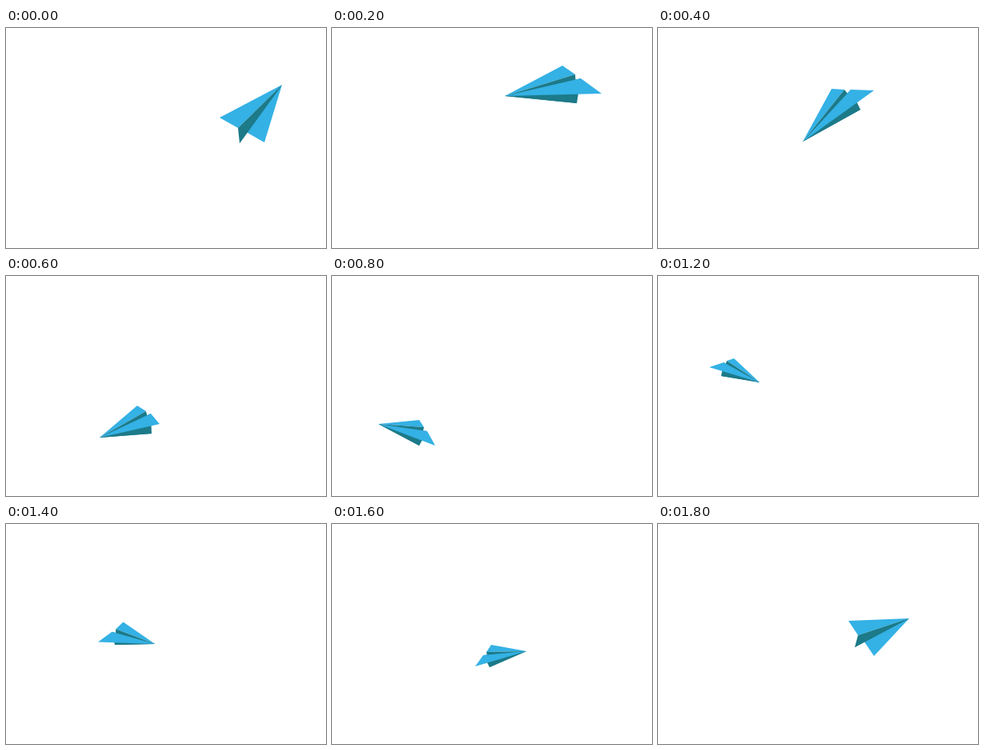
An HTML page with a canvas for the animation above (1.9 s loop, 400 by 275 pixels).

```html
<!DOCTYPE html>
<html lang="en">
<head>
<meta charset="utf-8">
<title>Paper plane</title>
<style>
  html, body { margin: 0; width: 100%; height: 100%; overflow: hidden; background: #fff; }
  canvas { display: block; }
</style>
</head>
<body>
<canvas id="stage" width="400" height="275"></canvas>
<script>
const ctx = document.getElementById('stage').getContext('2d');
const LOOP = 1900, STEP = 100;
const PAPER = '#34b1e5', SHADE = '#1c7a89';

// Poses: time, then x,y of nose, left tip, left fold, keel, right fold, right tip.
const poses = [
  [0,    345, 71,  323, 143, 293, 126, 292, 144, 290, 125, 267, 112],
  [100,  284, 71,  356, 104, 320, 96,  303, 116, 305, 89,  270, 73],
  [200,  216, 85,  337, 82,  311, 63,  306, 94,  304, 58,  288, 47],
  [400,  181, 142, 270, 78,  241, 77,  253, 102, 233, 77,  217, 76],
  [600,  117, 202, 192, 185, 181, 172, 182, 197, 175, 169, 164, 162],
  [800,  58, 185,  129, 212, 119, 194, 109, 212, 115, 189, 109, 180],
  [1000, 40, 126,  30, 143,  52, 146,  54, 162,  58, 147,  82, 152],
  [1200, 127, 133, 95, 103,  86, 106,  79, 125,  82, 108,  64, 114],
  [1600, 243, 159, 199, 151, 193, 160, 197, 179, 189, 164, 179, 178],
  [1800, 314, 118, 270, 165, 253, 140, 246, 154, 250, 139, 238, 121]
];

// Pose at any index, with its time unwrapped past the loop ends.
function poseAt(i) {
  const n = poses.length, turn = Math.floor(i / n);
  const [time, ...coords] = poses[i - turn * n];
  return { time: time + turn * LOOP, coords };
}

// Smooth cubic path through the poses.
function interpolate(t) {
  const i = poses.findLastIndex(p => p[0] <= t);
  const [a, b, c, d] = [i - 1, i, i + 1, i + 2].map(poseAt);
  const span = c.time - b.time, u = (t - b.time) / span;
  const ease = u * u * (3 - 2 * u);
  const flat = [];
  b.coords.forEach((from, k) => {
    const to = c.coords[k];
    const leave = (to - a.coords[k]) / (c.time - a.time) * span;
    const arrive = (d.coords[k] - from) / (d.time - b.time) * span;
    flat.push(from + (to - from) * ease
      + leave * u * (1 - u) * (1 - u) - arrive * u * u * (1 - u));
  });
  return [0, 2, 4, 6, 8, 10].map(k => ({ x: flat[k], y: flat[k + 1] }));
}

function triangle(color, ...points) {
  ctx.fillStyle = color;
  ctx.beginPath();
  points.forEach(p => ctx.lineTo(p.x, p.y));
  ctx.fill();
}

function drawPlane([nose, leftTip, leftFold, keel, rightFold, rightTip]) {
  const left = { tip: leftTip, fold: leftFold };
  const right = { tip: rightTip, fold: rightFold };
  const wing = side => triangle(PAPER, nose, side.fold, side.tip);
  const body = side => triangle(SHADE, nose, side.fold, keel);
  const [far, near] = leftTip.y > rightTip.y ? [right, left] : [left, right];
  const fromBelow = (leftTip.x - nose.x) * (rightTip.y - nose.y)
    > (leftTip.y - nose.y) * (rightTip.x - nose.x);

  wing(far);
  if (fromBelow) wing(near);
  body(far);
  body(near);
  if (!fromBelow) wing(near);
}

function render(now) {
  const t = Math.floor((now - start) % LOOP / STEP) * STEP;
  ctx.fillStyle = '#fff';
  ctx.fillRect(0, 0, 400, 275);
  drawPlane(interpolate(t));
}

function loop() {
  render(performance.now());
  requestAnimationFrame(loop);
}

const start = performance.now();
loop();
</script>
</body>
</html>
```
